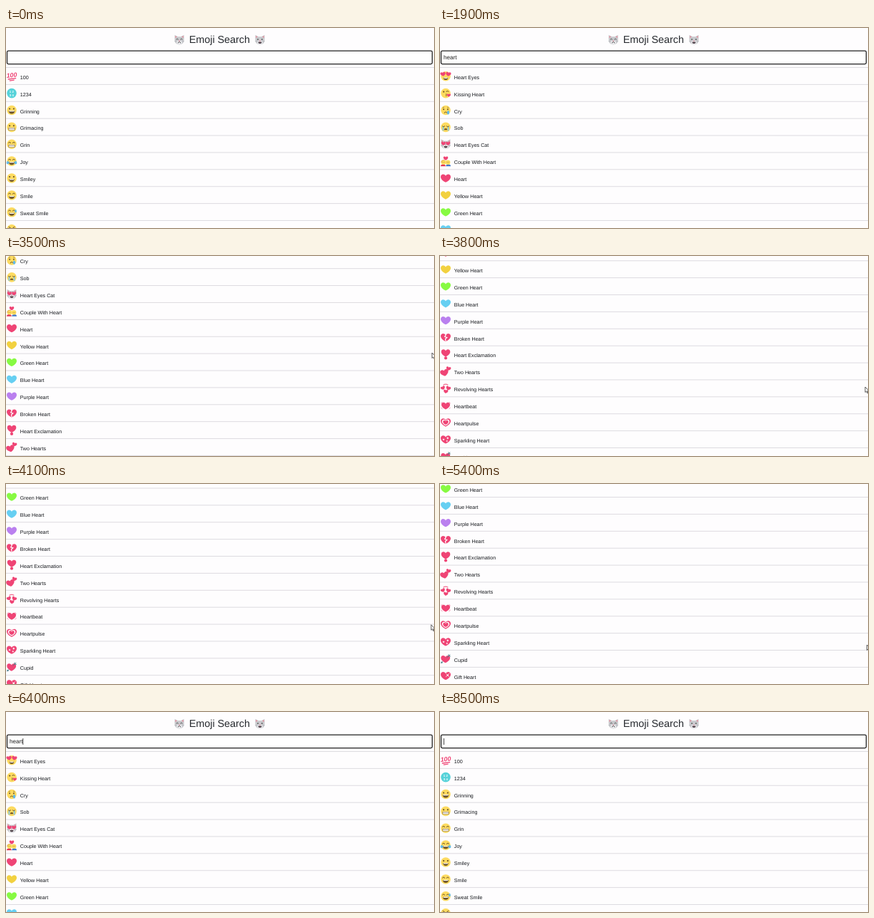
An HTML page with a canvas for the animation above (8600 ms loop, 600 by 281 pixels).

```html
<!DOCTYPE html>
<html lang="en">
<head>
<meta charset="utf-8">
<title>Emoji Search</title>
<style>
html, body { margin: 0; width: 100%; height: 100%; overflow: hidden; background: #fefdfe; }
canvas { display: block; width: 600px; height: 281px; }
</style>
</head>
<body>
<canvas id="stage" width="600" height="281"></canvas>
<script>
const c = document.getElementById('stage').getContext('2d');
const LOOP = 8600, PITCH = 23.89, FIRST_LINE = 55.5;
const FONT = '"Liberation Sans", Arial, sans-serif';
const BROWN = '#6b5228', RED = '#ef4475', YELLOW = '#fddb60', GREY = '#c9cace', TEAR = '#62bbea';

// Unhinted glyphs keep their true proportions at small sizes.
c.textRendering = 'geometricPrecision';

// Drawing helpers; icons use a box from -7 to 7 around their centre.
function fill(color, path) {
  c.beginPath();
  path();
  c.fillStyle = color;
  c.fill();
}
function line(color, width, path) {
  c.beginPath();
  path();
  c.strokeStyle = color;
  c.lineWidth = width;
  c.stroke();
}
function poly(...points) {
  for (let i = 0; i < points.length; i += 2) c.lineTo(points[i], points[i + 1]);
}
const dot = (x, y, r, color) => fill(color, () => c.arc(x, y, r, 0, Math.PI * 2));
const oval = (x, y, rx, ry, color) => fill(color, () => c.ellipse(x, y, rx, ry, 0, 0, Math.PI * 2));
function arch(x, y, r, color = BROWN, up = true, width = 0.9) {
  line(color, width, () => c.arc(x, y, r, up ? Math.PI : 0, up ? 0 : Math.PI));
}
function text(str, x, y, size, color, style = '') {
  c.font = `${style} ${size}px ${FONT}`;
  c.fillStyle = color;
  c.fillText(str, x, y);
}
function heart(color = RED, x = 0, y = 0, size = 1, turn = 0) {
  c.save();
  c.translate(x, y);
  c.rotate(turn);
  c.scale(size, size);
  fill(color, () => {
    c.moveTo(0, 5.7);
    c.bezierCurveTo(-3.4, 4.2, -7, 1.3, -7, -1.9);
    c.bezierCurveTo(-7, -6.3, -1.9, -6.7, 0, -3.4);
    c.bezierCurveTo(1.9, -6.7, 7, -6.3, 7, -1.9);
    c.bezierCurveTo(7, 1.3, 3.4, 4.2, 0, 5.7);
  });
  c.restore();
}

const disc = () => dot(0, 0, 6.8, YELLOW);
const both = draw => { draw(-2.9); draw(2.9); };
const roundEyes = () => both(x => dot(x, -2, 1.1, BROWN));
const archEyes = () => both(x => arch(x, -1.3, 1.5));
function grin(y = 1, r = 4) {
  fill(BROWN, () => c.arc(0, y, r, 0, Math.PI));
  c.fillStyle = '#fff';
  c.fillRect(-r + 0.7, y, 2 * r - 1.4, 1.2);
}
function teeth() {
  c.fillStyle = BROWN;
  c.fillRect(-4.4, 0.6, 8.8, 3.8);
  c.fillStyle = '#fff';
  c.fillRect(-3.9, 1, 7.8, 1.3);
  c.fillRect(-3.9, 2.7, 7.8, 1.3);
}
function cat(eyes, mouth) {
  both(x => {
    const s = Math.sign(x);
    fill(GREY, () => poly(s * 6.5, -7, s * 6.6, 0, s, -4));
    fill('#e58a98', () => poly(s * 5.6, -5.6, s * 5.6, -2.6, s * 3.2, -4.2));
  });
  oval(0, 1, 6.5, 5.8, GREY);
  oval(0, 3.8, 3.8, 2.8, '#ececef');
  eyes();
  oval(0, 1.4, 1, 0.7, '#e07a8c');
  mouth();
  both(x => line('#9b9ca3', 0.5, () => poly(x * 1.5, 2.3, x * 2.35, 1.8)));
}
const catMouth = () => fill('#50434a', () => c.arc(0, 2.7, 2.5, 0, Math.PI));

const icons = {
  '100'() {
    c.save();
    c.rotate(-0.1);
    text('100', -7.3, 1.5, 8.9, RED, 'italic bold');
    line(RED, 1.4, () => poly(-5.6, 3.8, 5.8, 3.5));
    line(RED, 1.3, () => poly(-3.8, 6, 3, 5.8));
    c.restore();
  },
  '1234'() {
    dot(0, 0, 6.8, '#55d2d9');
    text('1 2', -3.2, -0.5, 4.3, '#fff', 'bold');
    text('3 4', -3.2, 4, 4.3, '#fff', 'bold');
  },
  Grinning() { disc(); roundEyes(); grin(0.7, 4.4); },
  Grimacing() { disc(); roundEyes(); teeth(); },
  Grin() { disc(); archEyes(); teeth(); },
  Joy() {
    disc(); archEyes(); grin();
    both(x => oval(x * 1.9, 2, 1.8, 2.2, TEAR));
  },
  Smiley() { disc(); roundEyes(); grin(1.2, 3.7); },
  Smile() { disc(); archEyes(); grin(); },
  'Sweat Smile'() { disc(); archEyes(); grin(); oval(5.5, -1.5, 1.3, 2.2, TEAR); },
  Laughing() {
    disc();
    both(x => line(BROWN, 1, () => poly(x * 1.5, -3.5, x * 0.6, -2, x * 1.5, -0.8)));
    grin();
  },
  'Heart Eyes'() { disc(); grin(2, 3.2); both(x => heart(RED, x * 1.3, -2.9, 0.52, x * 0.05)); },
  'Kissing Heart'() {
    disc();
    dot(-2.8, -2, 1.1, BROWN);
    arch(2.4, -1.6, 1.5);
    line(BROWN, 0.8, () => { c.arc(0, 1.7, 0.9, -1.5, 1.5); c.arc(0, 3.5, 0.9, -1.5, 1.5); });
    heart(RED, 4.3, 3, 0.38);
  },
  Cry() {
    disc();
    both(x => {
      dot(x, -1.3, 1, BROWN);
      line(BROWN, 0.6, () => poly(x * 1.5, -3.4, x * 0.7, -4.4));
    });
    arch(0, 4.3, 1.8);
    oval(3.5, 3.2, 1.7, 2.7, TEAR);
  },
  Sob() {
    disc();
    both(x => {
      c.fillStyle = '#82c6e4';
      c.fillRect(x * 1.25 - 0.9, -1, 1.8, 6);
      arch(x, -2, 1.5, BROWN, false);
    });
    fill(BROWN, () => c.arc(0, 4, 2.3, Math.PI, 0));
  },
  'Heart Eyes Cat'() { cat(() => both(x => heart(RED, x * 1.1, -1, 0.44)), catMouth); },
  'Couple With Heart'() {
    both(x => {
      fill(x < 0 ? '#e13452' : '#3f77c8', () => c.ellipse(x * 1.25, 7, 3.4, 2.6, 0, Math.PI, 0));
      dot(x * 1.05, 1.6, 3.3, YELLOW);
      dot(x * 1.05 - 1, 1.6, 0.45, BROWN);
      dot(x * 1.05 + 1, 1.6, 0.45, BROWN);
    });
    line('#d9973c', 0.8, () => c.arc(-3.1, 1.6, 3.1, 3, 5.3));
    heart(RED, 0, -4, 0.47);
  },
  Heart() { heart(); },
  'Yellow Heart'() { heart('#f2d140'); },
  'Green Heart'() { heart('#87fa42'); },
  'Blue Heart'() { heart('#66cff2'); },
  'Purple Heart'() { heart('#ba80ef'); },
  'Broken Heart'() {
    heart();
    line('#fff', 1.2, () => poly(0.6, -4.4, -1.3, -1, 1.8, 0, -0.5, 2, 0.2, 5.6));
  },
  'Heart Exclamation'() { heart(RED, 0, -2, 0.9); dot(0, 5, 2.1, RED); },
  'Two Hearts'() { heart(RED, -1.7, 1.7, 0.82, -0.25); heart(RED, 3.9, -4, 0.47, 0.25); },
  'Revolving Hearts'() {
    heart(RED, 3.6, -0.4, 0.48, 0.4);
    heart(RED, -3.8, -0.8, 0.45, -0.5);
    heart(RED, 0.2, 4.2, 0.45, 0.1);
    line('#f26a90', 1.2, () => c.arc(0, 0, 6, 4.1, 5.3));
  },
  Heartbeat() {
    heart(RED, 0, 0.5, 0.86);
    both(x => {
      const side = x < 0 ? Math.PI : 0;
      line('#f589a9', 0.9, () => c.arc(0, 0, 6.9, side - 0.85, side - 0.4));
      line('#f589a9', 0.9, () => c.arc(0, 0, 6.9, side + 0.4, side + 0.85));
    });
  },
  Heartpulse() { heart(); heart('#fff', 0, 0, 0.75); heart(RED, 0, 0, 0.54); },
  'Sparkling Heart'() {
    heart();
    for (const [x, y, r] of [[-3, 0, 1.7], [2.8, -2, 1.8], [1.8, 2.2, 1.5]])
      fill('#fff', () => poly(x, y - r, x + r / 3, y - r / 3, x + r, y, x + r / 3, y + r / 3,
        x, y + r, x - r / 3, y + r / 3, x - r, y, x - r / 3, y - r / 3));
  },
  Cupid() {
    heart(RED, -0.3, 0.4, 0.92);
    line('#477b86', 0.9, () => poly(-6.3, 5.7, -3.8, 3.5));
    line('#477b86', 0.9, () => poly(1.6, -1.7, 6.3, -6));
    fill('#477b86', () => poly(-6.8, 6.2, -6.2, 3.4, -3.9, 5.6));
    line('#477b86', 1, () => poly(4, -6.4, 4.2, -4, 6.7, -3.7));
  },
  'Gift Heart'() {
    heart();
    line('#f8c6d3', 1, () => poly(0.5, -3, 5.2, 1.6));
    line('#f8c6d3', 1, () => poly(5.6, -4, 0, 1.5));
    dot(2.8, -1, 1.1, '#fff');
  }
};

const names = Object.keys(icons);
const allRows = names.slice(0, 10);
const hRows = names.slice(0, 12).filter(n => n !== '1234' && n !== 'Grimacing');
const heartRows = names.slice(10);

// Timing
const TYPE_START = 200, TYPE_STEP = 200, ERASE_START = 6800, ERASE_STEP = 150;
const SCROLL = [[3100, 0], [3200, 11], [3400, 72], [3600, 147], [3800, 216], [4000, 235],
  [4300, 252], [5400, 252], [5600, 205], [5800, 112], [6000, 27], [6150, 0]];
const POINTER = [[3300, 598, 104], [3800, 596, 184], [4300, 596, 207], [4900, 597, 243],
  [5400, 598.5, 226], [5800, 597, 132], [6150, 599, 76]];

function at(keys, t, field = 1) {
  if (t <= keys[0][0]) return keys[0][field];
  const i = keys.findIndex(k => k[0] >= t);
  if (i < 0) return keys[keys.length - 1][field];
  const a = keys[i - 1], b = keys[i];
  return a[field] + (b[field] - a[field]) * (t - a[0]) / (b[0] - a[0]);
}
function query(t) {
  const typed = Math.floor((t - TYPE_START) / TYPE_STEP) + 1;
  const erased = Math.floor((t - ERASE_START) / ERASE_STEP) + 1;
  const count = Math.min(5, Math.max(0, typed)) - Math.min(5, Math.max(0, erased));
  return 'heart'.slice(0, count);
}
function caretVisible(t) {
  if (t < TYPE_START) return false;
  if (t < 1000 || (t >= ERASE_START && t < 7400)) return true;
  const since = t < ERASE_START ? t - 1000 : t - 7400;
  return since % 1000 < 500;
}

function icon(draw, x, y) {
  c.save();
  c.translate(x, y);
  draw();
  c.restore();
}
function drawHeader(t) {
  icon(() => cat(() => both(x => arch(x, -0.2, 1.3, '#555')), () => arch(0, 4.7, 1.8, '#555')), 243, 16.7);
  icon(() => cat(() => both(x => dot(x, -0.7, 0.9, '#555')), catMouth), 356, 16.7);
  text('Emoji Search', 256.7, 21.4, 14.35, '#26292e');
  c.beginPath();
  c.roundRect(1.5, 32.2, 596, 18.4, 1.8);
  c.fillStyle = '#fff';
  c.fill();
  c.strokeStyle = '#202020';
  c.lineWidth = 1.3;
  c.stroke();
  const value = query(t);
  text(value, 5, 44.1, 8.1, '#1c1c1c');
  if (caretVisible(t)) {
    c.fillStyle = '#222';
    c.fillRect(5 + c.measureText(value).width, 37, 0.8, 9);
  }
}
function drawRow(name, i) {
  const y = FIRST_LINE + i * PITCH;
  line('#dddbe0', 1, () => poly(0, y, 600, y));
  icon(icons[name], 8, y + 12.2);
  text(name, 19.8, y + 16.3, 7.17, '#15181c');
}
function drawPointer(t) {
  if (t < 3300 || t > 6150) return;
  c.save();
  c.translate(at(POINTER, t), at(POINTER, t, 2));
  c.beginPath();
  poly(0, 0, 0, 7.5, 1.7, 6, 3, 8.8, 4.2, 8.2, 3, 5.5, 5.3, 5.4);
  c.closePath();
  c.fillStyle = '#fff';
  c.fill();
  c.strokeStyle = '#333';
  c.lineWidth = 0.8;
  c.stroke();
  c.restore();
}
function render(now) {
  const t = Math.floor((now % LOOP) / 100) * 100;
  const value = query(t);
  const rows = value === '' ? allRows : value === 'h' ? hRows : heartRows;
  c.fillStyle = '#fefdfe';
  c.fillRect(0, 0, 600, 281);
  c.save();
  c.translate(0, -at(SCROLL, t));
  drawHeader(t);
  rows.forEach(drawRow);
  c.restore();
  drawPointer(t);
}
const start = performance.now();
function tick() {
  render(performance.now() - start);
  requestAnimationFrame(tick);
}
tick();
</script>
</body>
</html>
```
